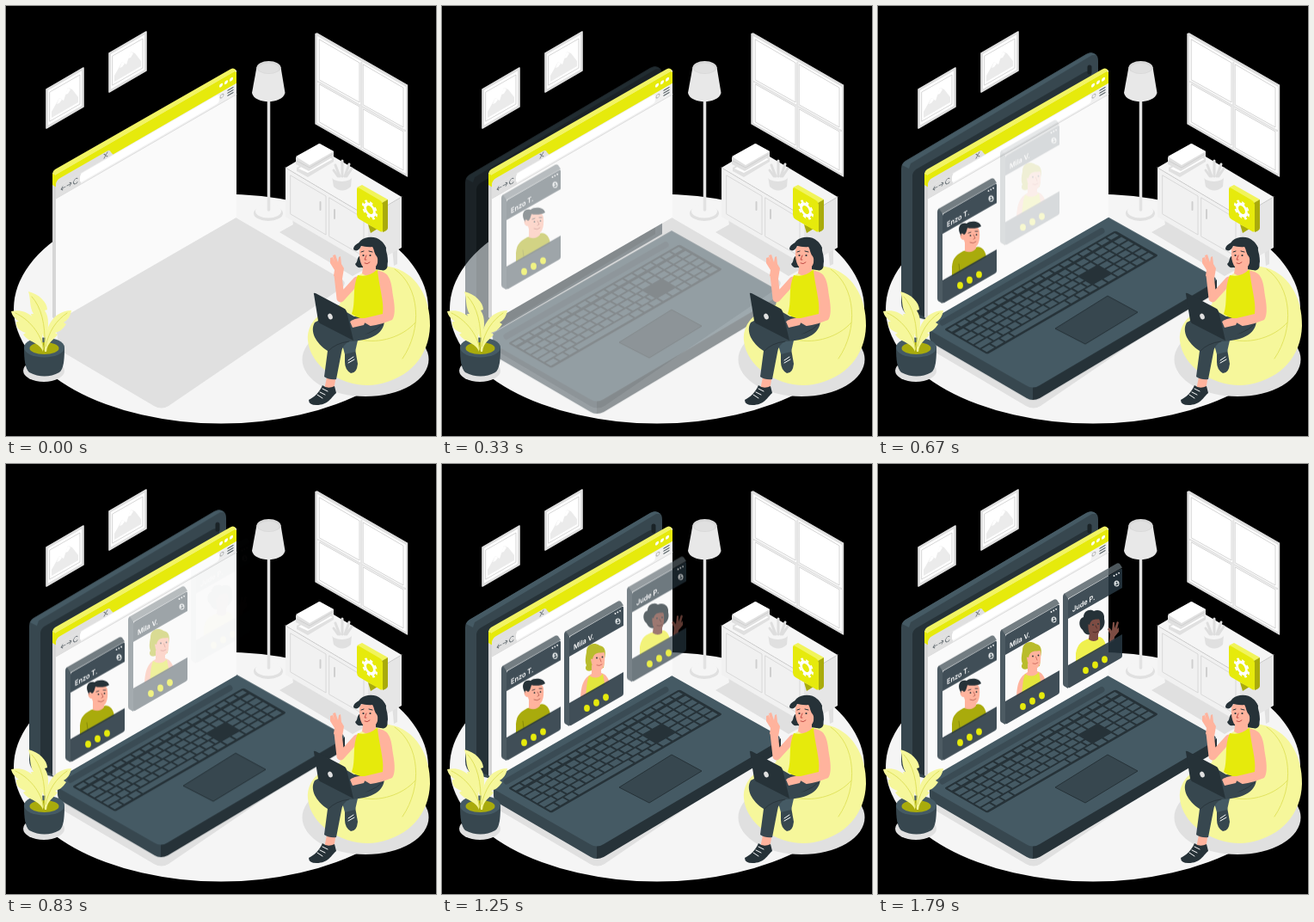
Recreate the animation shown at these times as an HTML page. Size 500 by 500 pixels, loop 1.83 s.

```html
<!DOCTYPE html>
<html lang="en">
<head>
<meta charset="utf-8">
<title>Video call</title>
<style>
html, body { margin: 0; width: 100%; height: 100%; overflow: hidden; background: #000; }
svg { display: block; width: 100vw; height: 100vh; }
text { font-family: Inter, Roboto, "Liberation Sans", sans-serif; font-size: 8.5px; font-weight: 600; fill: #fff; }

.laptop, .card { animation: 1830ms linear infinite both; }
.laptop { animation-name: rise; }
.card1 { animation-name: drop1; }
.card2 { animation-name: drop2; }
.card3 { animation-name: drop3; }

/* The first pair starts 50 ms into its ease, so it uses the rest of that curve. */
@keyframes rise {
  0% { opacity: 0; transform: translateY(29.8px); animation-timing-function: cubic-bezier(.341, .1125, .499, 1.365); }
  51.91%, 100% { opacity: 1; transform: none; }
}
@keyframes drop1 {
  0% { opacity: 0; transform: translateY(-29.8px); animation-timing-function: cubic-bezier(.341, .1125, .499, 1.365); }
  51.91%, 100% { opacity: 1; transform: none; }
}
@keyframes drop2 {
  0%, 24.59% { opacity: 0; transform: translateY(-30px); animation-timing-function: cubic-bezier(.36, -.01, .5, 1.38); }
  79.23%, 100% { opacity: 1; transform: none; }
}
@keyframes drop3 {
  0%, 40.98% { opacity: 0; transform: translateY(-30px); animation-timing-function: cubic-bezier(.36, -.01, .5, 1.38); }
  95.63%, 100% { opacity: 1; transform: none; }
}

.d { fill: #263238; } .m { fill: #37474f; } .l { fill: #455a64; }
.w { fill: #fff; } .g0 { fill: #f5f5f5; } .g1 { fill: #ebebeb; } .g2 { fill: #e0e0e0; }
.lime { fill: #e6ea0c; } .pale { fill: #f6f79b; } .olive { fill: #a9ab0c; }
.skin { fill: #ffb39d; } .brown { fill: #7d4c43; } .blond { fill: #b9bc2c; }
.line { fill: none; stroke-linecap: round; stroke-linejoin: round; }
.glass { fill: #263640; fill-opacity: .88; }
</style>
</head>
<body>
<svg viewBox="0 0 500 500">
<defs>
  <clipPath id="photo"><path d="M75 264L138 228V284L75 320Z"/></clipPath>
  <g id="back">
    <path fill="#4d5b63" d="M69 238Q69 235.500 71 234.500L75 240V345L70 342Q69 341 69 339Z"/>
    <path fill="#5b676d" fill-opacity=".85" d="M70 235L131 200Q133 198.500 135 200L138 204.500L75 240.500Z"/>
  </g>
  <g id="front">
    <path class="glass" d="M75 243Q75 241 77 240L136 206Q138 205 138 207V228L75 264Z"/>
    <path class="glass" d="M75 318L138 282V307Q138 309 136 310L77 344Q75 345 75 343Z"/>
    <g class="lime"><ellipse cx="95.500" cy="324" rx="3.400" ry="4.100"/><ellipse cx="106.500" cy="317.700" rx="3.400" ry="4.100"/><ellipse cx="117.500" cy="311.300" rx="3.400" ry="4.100"/></g>
    <g class="w"><circle cx="128.500" cy="214" r=".9"/><circle cx="131.300" cy="212.400" r=".9"/><circle cx="134.100" cy="210.800" r=".9"/>
      <ellipse cx="131.500" cy="223" rx="3" ry="3.600" fill="#dfe3e5"/></g>
    <path class="m" d="M129.500 225.500Q131.500 222 133.500 223.300L133 225Z"/><circle class="m" cx="131.500" cy="221.800" r="1"/>
  </g>
  <g id="picture">
    <path class="g2" stroke="#e0e0e0" stroke-width="1.600" stroke-linejoin="round" d="M0 25L43 0V45L0 70Z"/>
    <path class="w" d="M2 26L41 3.500V44L2 66.500Z"/>
    <path class="line" stroke="#c4c4c4" stroke-width=".7" d="M4 28L39 8V42L4 62Z"/>
    <path class="g1" d="M6 58V51L15 35L20 38L25 23L30 25L37 34V40Z"/>
    <path class="w" d="M15 35L18 37L15 41L12 42ZM25 23L28 25L25 30L22 31Z"/>
  </g>
</defs>

<!-- Room -->
<ellipse class="g0" cx="250" cy="352" rx="241" ry="133.500"/>
<path class="g2" d="M57 366L267 246L391 318Q397 323 390 328L189 465Q181 470 172 465L62 400Z"/>
<use href="#picture" x="47" y="72"/>
<use href="#picture" x="120" y="30"/>

<g>
  <path class="g2" stroke="#e0e0e0" stroke-width="1.400" stroke-linejoin="round" d="M360 32.500L362 32L466.500 92V198L360 137Z"/>
  <path class="w" d="M362 35L465 94V195L362 136Z"/>
  <path class="line" stroke="#c9c9c9" stroke-width=".8" d="M364.500 39L411 66V112L364.500 86ZM415.500 68L462 95V141L415.500 115ZM364.500 91L411 117V162L364.500 135ZM415.500 120L462 146V191L415.500 165Z"/>
  <path class="line" stroke="#e5e5e5" stroke-width="2.500" d="M363 88L464 145M413.300 66V164"/>
</g>

<ellipse class="g2" cx="305" cy="241" rx="17" ry="9"/>
<ellipse class="g0" cx="305" cy="238.500" rx="15" ry="8"/>
<path class="line" stroke="#e2e2e2" stroke-width="3.500" d="M305.500 106V237"/>
<path fill="#e8e8e8" d="M291.500 71L286 101C288.500 114.500 321.500 114.500 324.500 101L319.500 71Z"/>
<ellipse fill="#d8d8d8" cx="305.500" cy="71.500" rx="14" ry="7.500"/>
<ellipse class="g2" cx="305.500" cy="72.500" rx="12" ry="5.800"/>

<!-- Cabinet -->
<path class="g2" d="M318 263L343 249L430 299L403 314Z"/>
<path class="g2" d="M333 246h5v17l-3 2zM411 292h5v14h-3zM449 280h6v20l-4 2z"/>
<path class="g0" d="M325 188L364 165L460 222L421 245Z"/>
<path fill="#f1f1f1" d="M325 188L421 245V301L325 245Z"/>
<path fill="#e6e6e6" d="M421 245L460 222V281L421 303Z"/>
<path class="line" stroke="#d6d6d6" stroke-width=".9" d="M325 188L421 245L460 222M331 197L372 221V266L331 242ZM376 223L416 247V291L376 268Z"/>
<path class="line" stroke="#cfcfcf" stroke-width="2" d="M365.500 228V237M382 237V247"/>
<path class="g2" d="M338 188L368 171L381 177V181L351 199L338 192Z"/>
<path class="w" d="M340 189L367 173L380 178L351 194Z"/>
<path class="g2" d="M337 176L365 160L381 169V175L352 192L337 184Z"/>
<path class="w" d="M337 175L364 160L381 169L353 185Z"/>
<path class="line" stroke="#c9c9c9" stroke-width=".7" d="M338 180L353 188L380 172"/>
<path class="g2" d="M379 198H402L401 210Q391 219 381 210Z"/>
<ellipse class="g0" cx="390.500" cy="198" rx="12" ry="6"/>
<path class="line" stroke="#dedede" stroke-width="3" d="M391 198V180M388 198L383 185M394 198L399 184M386 198L381 191M396 198L402 189"/>

<!-- Laptop -->
<g class="laptop">
  <path class="m" d="M27 190Q27 184 32 181L242 57Q249 53 254 58Q256 60 256 65V250L57 366L34 360Q27 354 27 346Z"/>
  <path class="l" d="M28 186Q29 183 32 181L242 57Q249 53 254 58L249 58L38 184L36 190Z"/>
  <path class="d" d="M40 199Q40 194 44 191L240 78Q248 74 248 82V250L58 364L40 356Z"/>
  <path class="line" stroke="#1a2327" stroke-width="5" d="M246 72V78"/>
  <path class="m" d="M60 374L180 443V459Q176 459 173 457L65 394Q60 391 60 386Z"/>
  <path class="d" d="M180 443L394 319V330Q394 334 389 337L188 457Q184 459 180 459Z"/>
  <path class="l" d="M58 366L267 246L390 315Q396 319 390 323L188 442Q180 447 172 442L60 378Z"/>
  <path class="line" stroke="#3a4b54" stroke-width="7" d="M75 369L260 262.500"/>
  <g transform="matrix(1 -.577 1 .577 77 377)">
    <rect class="d" width="199" height="50" rx="2"/>
    <path id="keys" class="l"/>
  </g>
  <path class="m" stroke="#263238" stroke-width="1" d="M206 376L267 338L302 357L241 394Z"/>
</g>

<!-- Browser window -->
<path fill="#d6d6d6" d="M54 194L59 197V366L54 362Z"/>
<path class="lime" d="M54 194L59 197V211L54 208Z"/>
<path fill="#f2f463" d="M54 195Q54 192 57 190L260 74Q264 71 267 74L268 76L58 197Z"/>
<g transform="matrix(1 -.577 0 1 58 196)">
  <rect fill="#fafafa" width="210" height="171"/>
  <path class="lime" d="M0 0H207Q210 0 210 3V16H0Z"/>
  <path class="g2" d="M0 16V12Q0 7 5 7H59Q63 7 64 11L67 16Z"/>
  <rect fill="#f0f0f0" y="15" width="210" height="13"/>
  <rect class="g2" y="15" width="29" height="13"/>
  <rect class="w" x="28" y="16" width="162" height="10" rx="3"/>
  <path class="line" stroke="#dcdcdc" d="M0 28H210"/>
  <path class="line" stroke="#6b7378" stroke-width=".9" d="M6 20.500H11M8 18.500L6 20.500L8 22.500M13 20.500H18M16 18.500L18 20.500L16 22.500M25 19A2.500 3 0 1 0 25 23M56 8.500L60 13.500M60 8.500L56 13.500"/>
  <path class="line" stroke="#555f64" stroke-width="1.300" d="M200 17.500H206M200 20.500H206M200 23.500H206"/>
  <circle fill="none" stroke="#aaa" stroke-width=".8" cx="193" cy="20" r="2"/>
  <g class="w"><circle cx="192" cy="7" r="2"/><circle cx="198" cy="7" r="2"/><circle cx="204" cy="7" r="2"/></g>
</g>

<!-- Callers -->
<g class="card card1">
  <use href="#back"/>
  <g clip-path="url(#photo)">
    <path class="olive" d="M86 325V302C87 291 92 288 99 284L116 279C124 280 126 286 127 300V325Z"/>
    <path class="skin" d="M101 274H114V281Q109 287 101 284Z"/>
    <path class="skin" d="M99 258C102 252 117 252 118 261C119 273 116 280 110 280C104 280 101 276 100 271C95 271 94 263 98 263Z"/>
    <path class="d" d="M95 263C92 255 97 250 103 252C108 248 118 249 120 255C116 258 108 258 104 257C103 261 102 264 100 265C97 262 96 264 97 267Z"/>
    <path class="line" stroke="#263238" stroke-width=".8" d="M105 263L108 262M113 261L116 261"/>
    <path class="line" stroke="#b35b50" stroke-width=".8" d="M107 274Q111 276 114 273M111 265L113 269L111 270"/>
    <g class="d"><circle cx="107.500" cy="266" r=".9"/><circle cx="114.500" cy="265" r=".9"/></g>
    <path class="line" stroke="#828509" stroke-width=".9" d="M94 299L96 314M120 294L121 308"/>
  </g>
  <use href="#front"/>
  <text transform="matrix(.866 -.5 0 1 80 256.500)">Enzo T.</text>
</g>

<g class="card card2">
  <g transform="translate(73 -42)">
    <use href="#back"/>
    <g clip-path="url(#photo)">
      <path class="blond" d="M95 259C95 249 104 247 110 251C117 252 118 259 116 266L115 277L101 280C96 282 92 279 95 274C93 270 94 264 95 259Z"/>
      <path class="skin" d="M88 320C88 300 90 290 101 284V274H112V283C121 285 124 296 126 320Z"/>
      <path fill="#e3e63d" d="M92 320C96 306 94 296 98 286Q107 292 114 284C116 294 117 302 122 320Z"/>
      <path class="skin" d="M100 258Q113 253 116 260C117 273 115 280 109 280C103 280 99 273 100 258Z"/>
      <path class="blond" d="M98 266C97 254 107 250 116 259C110 260 104 258 102 267Z"/>
      <g class="d"><circle cx="107" cy="265.500" r=".9"/><circle cx="113.500" cy="264.500" r=".9"/></g>
      <path class="line" stroke="#c55e55" stroke-width=".8" d="M107 274Q110 275.500 113 273M110.500 266L112 270"/>
    </g>
    <use href="#front"/>
    <text transform="matrix(.866 -.5 0 1 80 256.500)">Mila V.</text>
  </g>
</g>

<g class="card card3">
  <g transform="translate(146 -84)">
    <use href="#back"/>
    <g clip-path="url(#photo)">
      <path fill="#eff04e" d="M84 325V304C86 293 91 290 99 287L112 285C120 288 121 302 123 325Z"/>
      <path class="brown" d="M100 278H110V288Q105 292 99 288ZM121 304L124 282L121 276L123 274L126 278L127 268L129 268L129 275L132 267L134 268L132 276L134 274L134 279L129 285L127 308Z"/>
      <path class="d" d="M92 277C86 272 88 263 93 262C93 254 101 252 105 255C112 252 118 257 117 264C119 271 115 276 112 278L101 282Q95 284 92 277Z"/>
      <path class="brown" d="M99 264C102 260 111 260 112 267C113 278 110 285 105 285C100 285 97 278 99 264Z"/>
      <path class="d" d="M96 269C96 259 108 256 114 264C107 265 102 263 100 271Z"/>
      <g class="d"><circle cx="104" cy="271" r=".9"/><circle cx="110" cy="270" r=".9"/></g>
      <path class="line" stroke="#4d2925" stroke-width=".9" d="M104 279.500Q107 281 110 278.500M107 272L108.500 275"/>
    </g>
    <use href="#front"/>
    <text transform="matrix(.866 -.5 0 1 80 256.500)">Jude P.</text>
  </g>
</g>

<!-- Plant -->
<ellipse class="g2" cx="44" cy="424" rx="24" ry="13"/>
<path class="m" d="M21 397H68C68 412 67 422 62 426Q45 435 27 426C22 421 21 411 21 397Z"/>
<ellipse class="l" cx="44.500" cy="397" rx="23.500" ry="11.500"/>
<ellipse class="olive" cx="44.500" cy="398" rx="17" ry="7"/>
<path class="pale" d="M43 402C39 391 26 391 20 382L23 380C16 378 11 374 12 367L15 367C10 363 7 360 6 355C22 351 36 361 42 380Z"/>
<path class="pale" d="M43 384C40 370 31 367 29 358L32 358C27 350 29 341 26 332C39 335 48 345 48 353L45 354C51 363 49 374 47 386Z"/>
<path class="pale" d="M45 402C44 372 55 355 76 354C75 361 71 366 67 368L70 370C66 376 62 379 57 380L60 382C55 389 48 391 47 402Z"/>
<path class="line" stroke="#dfe15c" stroke-width="1" d="M44 400C41 380 26 364 11 357M45 396C46 370 41 350 30 338M46 396C50 378 58 366 71 357"/>

<!-- Bean bag -->
<ellipse class="g2" cx="418" cy="411" rx="73.500" ry="43"/>
<path class="pale" d="M351 389C349 366 370 352 388 348C393 322 416 302 445 303C477 308 494 340 493 372C492 407 469 433 432 440C396 446 354 422 351 389Z"/>
<path class="line" stroke="#e2e45f" stroke-width="1" d="M452 306C481 326 485 375 461 410M387 348C382 365 392 381 412 388C434 393 461 385 476 368"/>

<!-- Speech bubble -->
<path class="olive" d="M421 254L424 264L432 259Z"/>
<path fill="#f1f45a" d="M408 211L414 208L444 225L438 229Z"/>
<path class="olive" d="M437 229L444 225V258Q444 261 438 263Z"/>
<path class="lime" d="M408 213Q408 210 411 212L435 226Q438 228 438 231V260Q438 264 435 262L411 248Q408 246 408 243Z"/>
<g class="line" stroke="#fff" transform="matrix(.88 .5 0 1 423 237)" style="stroke-linecap:butt">
  <circle r="6.200" stroke-width="3.400"/>
  <circle r="8.800" stroke-width="2.800" stroke-dasharray="3.456"/>
</g>

<!-- Woman -->
<path class="skin" d="M374 427L384 429L381 447L370 446Z"/>
<path class="m" d="M394 401L406 399L409 416Q408 427 401 427Q394 423 394 414Z"/>
<path class="line" stroke="#fff" stroke-width="1" d="M398 412L404 408M398 415L405 411"/>
<path class="l" d="M388 383L411 380L406 402L394 405Z"/>
<path class="m" d="M440 363C441 380 427 389 399 390Q391 394 390 403L384 434Q376 435 370 431L374 401C360 392 353 378 359 368C371 360 390 362 404 361Z"/>
<path class="line" stroke="#263238" stroke-width=".8" d="M399 390Q383 392 375 401M438 370Q424 384 401 383"/>
<path class="d" d="M368 441Q374 446 382 442L384 450C378 455 375 464 361 464Q352 464 352 458C358 455 364 450 368 441Z"/>
<path class="line" stroke="#fff" stroke-width="1" d="M365 449L371 452M362 452L368 456M368 445L374 448"/>
<path class="line" stroke="#ffb39d" stroke-width="9" d="M408 319L389 340L386 313"/>
<path class="skin" d="M381 314L382 307L377 299V293L380 292L382 298L380 290L383 289L386 298L387 292L389 291L390 300L393 305L391 317Z"/>
<path class="d" d="M412 290C407 293 410 297 406 300Q408 305 413 304L436 307C442 309 446 303 442 297C446 291 441 286 442 281C438 271 424 267 416 272Z"/>
<path class="skin" d="M416 298H430V309Q422 317 414 311Z"/>
<path class="lime" d="M409 313Q421 316 431 307Q442 310 442 321C445 337 442 350 439 362C426 367 411 365 402 358C407 345 402 329 409 313Z"/>
<path class="skin" d="M432 308C446 309 448 319 450 337Q454 358 449 365Q430 373 407 374L399 371Q401 363 417 363L438 358C440 345 435 332 432 308Z"/>
<path class="skin" d="M411 284C411 276 430 274 432 283C435 296 431 307 423 307C415 307 410 299 411 284Z"/>
<path class="d" d="M404 283C404 277 410 277 412 273C419 267 431 268 436 273C442 277 441 285 443 291C446 299 442 307 435 307C430 302 434 295 431 291C428 288 428 282 426 280C420 281 416 279 413 279C411 284 407 286 404 283Z"/>
<g class="d"><circle cx="415.500" cy="290" r="1.100"/><circle cx="423.500" cy="290" r="1.100"/></g>
<path class="line" stroke="#263238" stroke-width="1" d="M413 286L416 285M422 285L426 286"/>
<path class="line" stroke="#c34f48" stroke-width="1" d="M417 299Q420 301 423 298M419 290L417 295H419"/>
<path class="m" d="M396 356L427 374V377L404 389L394 385Z"/>
<path class="skin" d="M400 367Q408 361 419 364L416 371L403 374Z"/>
<path class="d" d="M358 335Q357 333 360 334L392 351Q395 352 396 355L404 389L367 370Q364 369 363 366Z"/>
<ellipse class="g2" cx="377" cy="361" rx="2.600" ry="3.600" transform="rotate(-22 377 361)"/>
</svg>
<script>
const key = (u, v, w, h) => `M${u} ${v}h${w}v${h}h${-w}z`;
const step = 10.9, gap = 2;
let d = "";
for (let row = 0; row < 6; row++) {
  const v = 2 + row * 7.9, h = row ? 6 : 4.8;
  for (let col = 0; col < 18; col++) {
    const arrows = col === 12 || col === 13;
    if (arrows && (row === 3 || row === 4)) continue;
    if (row === 5 && col > 3 && col < 9) continue;
    const main = col < 12;
    const shift = main && row < 5 ? row * 1.3 : 0;
    const u = 2 + col * step + (col ? shift : 0);
    let w = step - gap;
    if (col === 0) w += shift;
    if (col === 11) w -= shift;
    if (row === 5 && col === 3) w += 5 * step;
    d += key(u, v, w, h);
  }
}
document.getElementById("keys").setAttribute("d", d);
</script>
</body>
</html>
```
